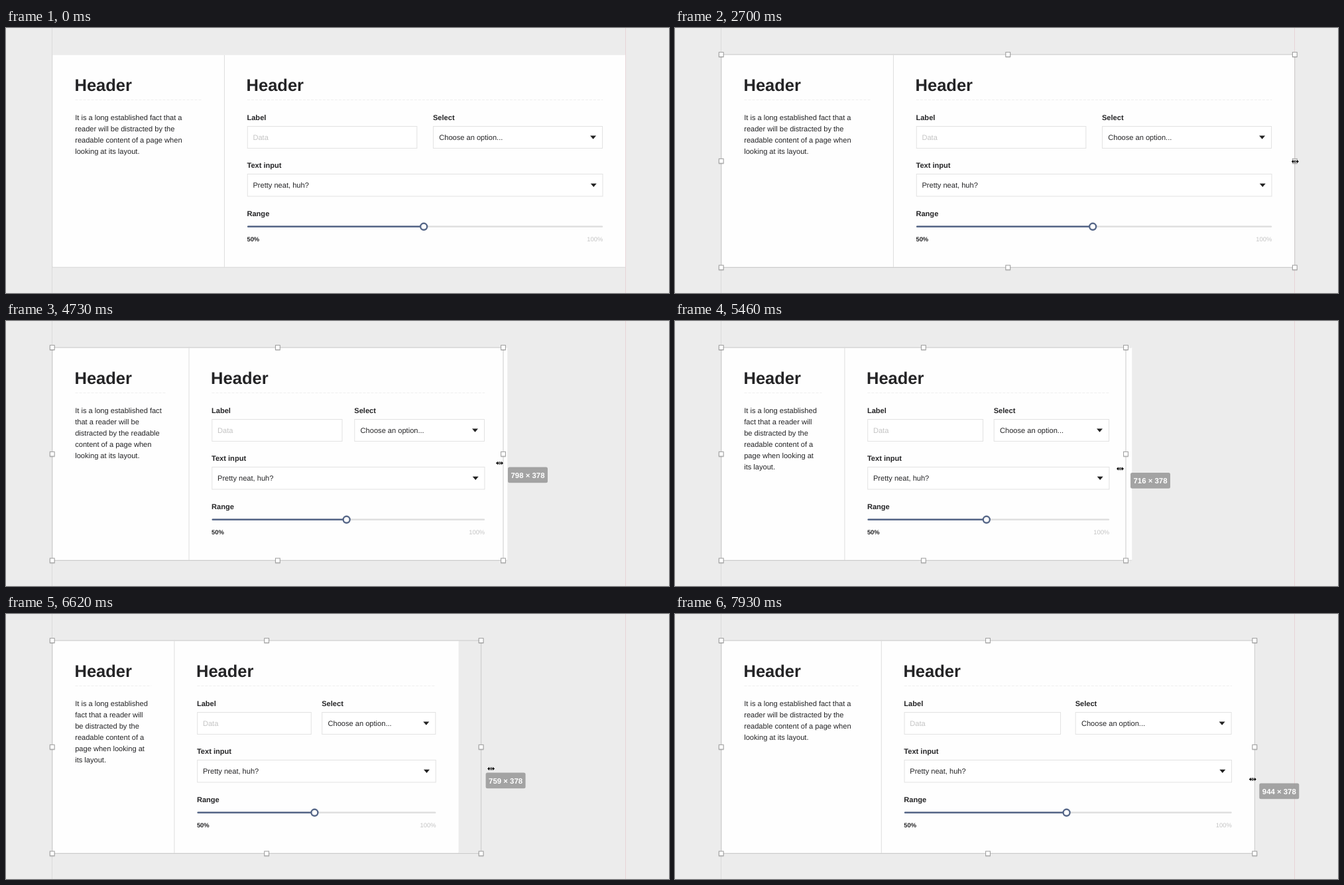
These frames come from a looping animation (1000 by 400 pixels, 7.99 s). An HTML page:

```html
<!DOCTYPE html>
<html lang="en">
<head>
<meta charset="utf-8">
<title>Resizable form</title>
<style>
  html, body { margin: 0; width: 100%; height: 100%; overflow: hidden; background: #ececec; }
  svg { display: block; width: 1000px; height: 400px; }
  text {
    font: 11.08px "Liberation Sans", Arial, sans-serif;
    fill: #242426;
    text-rendering: geometricPrecision;
  }
  .bold { font-weight: bold; }
  .head { font-size: 25.5px; font-weight: bold; }
  .tiny { font-size: 9.37px; }
  .pale { fill: #c4c4c4; }
  .field { fill: #fff; stroke: #e2e2e2; }
  .rule { stroke: #efefef; stroke-dasharray: 4 2; }
</style>
</head>
<body>
<svg id="stage" viewBox="0 0 1000 400" xmlns="http://www.w3.org/2000/svg"></svg>
<script>
const LOOP = 7990;
const LEFT = 70, TOP = 40, BOTTOM = 361.5, PAD = 34.5;
const FULL = 934.8;
const UNITS = 1015 / 865;
const BLUE = '#566788';
const COPY = ('It is a long established fact that a reader will be distracted by the ' +
  'readable content of a page when looking at its layout.').split(' ');

// Motion keys: [time, value]
const EDGE = [[3660, FULL], [3865, 889.6], [3950, 872], [4370, 798], [4645, 756.7],
  [4730, 750], [5230, 710], [5375, 689.7], [5460, 680], [5800, 648], [6040, 637],
  [6250, 640], [6400, 654], [6535, 683], [6620, 716.6], [6870, 777], [7100, 819],
  [7400, 859], [7720, 873], [7845, 874.3], [7930, 874.3]];
const LEAD = [[3660, 0.6], [3950, -14.5], [4370, -8], [4730, -5.5], [5460, -8.5],
  [6040, -4], [6620, 15], [6870, 9], [7400, 0], [7930, -3]];
const HAND_Y = [[3660, 201.5], [3950, 201], [4730, 214.5], [5460, 223], [6620, 233.5], [7930, 249.5]];
const ARROW_X = [[900, 958], [1150, 912], [1860, 912], [2150, 932], [2420, 943], [2650, 935]];
const ARROW_Y = [[900, 396], [1150, 332], [1860, 332], [2150, 275], [2420, 220], [2650, 201]];

// Dragging redraws in uneven ticks between these times
const TICKS = [3660, 3950, 4370, 4460, 4730, 5230, 5310, 5460, 6040, 6130, 6620, 6870,
  6960, 7720, 7810, 7930];
const TEAR = 3950;
const LAG = 85;

function curve(keys, t) {
  const last = keys.length - 1;
  if (t <= keys[0][0]) return keys[0][1];
  if (t >= keys[last][0]) return keys[last][1];
  let i = 0;
  while (t >= keys[i + 1][0]) i++;
  const slope = j => j === 0 || j === last ? 0
    : (keys[j + 1][1] - keys[j - 1][1]) / (keys[j + 1][0] - keys[j - 1][0]);
  const [t0, a] = keys[i], [t1, b] = keys[i + 1];
  const d = t1 - t0, u = (t - t0) / d, v = 1 - u;
  return v * v * (1 + 2 * u) * a + u * u * (3 - 2 * u) * b
    + u * v * d * (v * slope(i) - u * slope(i + 1));
}

function snap(t) {
  if (t < TICKS[0]) return t;
  let i = TICKS.length - 1;
  while (t < TICKS[i]) i--;
  if (i === TICKS.length - 1) return TICKS[i];
  const gap = TICKS[i + 1] - TICKS[i];
  const step = gap / Math.max(1, Math.round(gap / 80));
  return TICKS[i] + Math.floor((t - TICKS[i]) / step) * step;
}

function set(node, attrs) {
  for (const k in attrs) node.setAttribute(k, attrs[k]);
}
function add(name, attrs, parent = stage) {
  const node = document.createElementNS('http://www.w3.org/2000/svg', name);
  set(node, attrs);
  return parent.appendChild(node);
}
function label(str, y, cls = '', extra = {}) {
  const node = add('text', { y, class: cls, ...extra });
  node.textContent = str;
  return node;
}
const field = (y, height) => add('rect', { class: 'field', y, height });
const caret = () => add('path', { d: 'M-4.5-2.5h9L0 2.7z', fill: '#222' });
const show = (node, on) => set(node, { visibility: on ? 'visible' : 'hidden' });
const move = (node, x, y) => set(node, { transform: `translate(${x} ${y})` });

const stage = document.getElementById('stage');

add('rect', { width: 1000, height: 400, fill: '#ececec' });
add('path', { d: 'M69.5 0V400', stroke: '#dadada' });
const shade = add('rect', { x: LEFT - 0.5, y: TOP + 0.5, height: 321.3, rx: 1.5, fill: '#d9d9d9' });
const card = add('rect', { x: LEFT + 0.3, y: TOP + 0.5, height: 320.3, rx: 1, fill: '#fefefe' });
const divider = add('path', { stroke: '#dedede' });
const rules = [add('path', { class: 'rule' }), add('path', { class: 'rule' })];

label('Header', 95.3, 'head', { x: 103.5 });
const lines = [];
for (let i = 0; i < 8; i++) lines.push(label('', 139 + 17 * i, '', { x: 104.2 }));

const title = label('Header', 95.3, 'head');
const captions = [label('Label', 139, 'bold'), label('Text input', 211, 'bold'),
  label('Range', 284, 'bold'), label('50%', 322.2, 'bold tiny')];
const pickName = label('Select', 139, 'bold');
const dataBox = field(148.5, 33), pickBox = field(148.5, 33), wideBox = field(220.5, 33.5);
const dataText = label('Data', 169, 'pale');
const pickText = label('Choose an option...', 169);
const wideText = label('Pretty neat, huh?', 241);
const pickCaret = caret(), wideCaret = caret();
const total = label('100%', 322.2, 'tiny pale', { 'text-anchor': 'end' });
const bar = { 'stroke-width': 2.6, 'stroke-linecap': 'round' };
const track = add('path', { ...bar, stroke: '#e0e0e0' });
const filled = add('path', { ...bar, stroke: BLUE });
const thumb = add('circle', { cy: 299.8, r: 5, fill: '#fff', stroke: BLUE, 'stroke-width': 2.4 });

add('path', { d: 'M934.5 0V400', stroke: '#e6cfd3', 'stroke-opacity': 0.8 });

const hover = add('rect', { x: 69.5, y: TOP, width: 865, height: 321.5,
  fill: 'none', stroke: '#7fb0ea', 'stroke-width': 2 });

const frame = add('g', {});
const outline = add('path', { fill: 'none', stroke: '#cbcbcb' }, frame);
const handles = [];
for (let i = 0; i < 8; i++) {
  const g = add('g', {}, frame);
  add('rect', { x: -4, y: -2.6, width: 8, height: 7.6, rx: 1, fill: '#000', opacity: 0.12 }, g);
  add('rect', { x: -3.4, y: -3.4, width: 6.8, height: 6.8, fill: '#fff', stroke: '#9b9b9b' }, g);
  handles.push(g);
}

const badge = add('g', {});
add('rect', { width: 60, height: 23.8, rx: 2.5, fill: '#999', opacity: 0.88 }, badge);
const size = add('text', { x: 30, y: 16.2, class: 'bold', 'text-anchor': 'middle',
  style: 'font-size:11.4px;fill:#fff' }, badge);

const arrow = add('path', { d: 'M0 0V11L2.6 8.6L4.3 12.3L6 11.5L4.4 8H7.8z',
  fill: '#000', stroke: '#fff', 'stroke-width': 0.9 });
const hand = add('path', {
  d: 'M-5.5 0L-2.6-2.7V-.6H-1.3V-2.2H-.4V2.2H-1.3V.6H-2.6V2.7z' +
     'M5.5 0L2.6-2.7V-.6H1.3V-2.2H.4V2.2H1.3V.6H2.6V2.7z',
  fill: '#000', stroke: '#fff', 'stroke-width': 1, 'paint-order': 'stroke' });

const pen = document.createElement('canvas').getContext('2d');
pen.font = '110.8px "Liberation Sans", Arial, sans-serif';
const measure = str => pen.measureText(str).width / 10;

function wrap(width) {
  const rows = [];
  let row = '';
  for (const word of COPY) {
    const next = row ? row + ' ' + word : word;
    if (row && measure(next) > width) {
      rows.push(row);
      row = word;
    } else row = next;
  }
  rows.push(row);
  lines.forEach((node, i) => { node.textContent = rows[i] || ''; });
}

function layout(right) {
  const width = right - LEFT;
  const mid = LEFT + 0.3 * width;
  const x = mid + PAD, end = right - PAD, w = end - x;
  const half = 0.4765 * w, px = x + 0.523 * w, pr = end - 0.7;

  set(shade, { width: width + 0.3 });
  set(card, { width: width - 0.5 });
  set(divider, { d: `M${mid} 41V361` });
  set(rules[0], { d: `M104.5 108.5H${mid - PAD}` });
  set(rules[1], { d: `M${x} 108.5H${end}` });
  wrap(0.3 * width - 2 * PAD);

  set(title, { x: x - 1.4 });
  captions.forEach(node => set(node, { x: x - 0.5 }));
  set(pickName, { x: px - 0.5 });
  set(dataBox, { x: x + 0.3, width: half });
  set(pickBox, { x: px, width: pr - px });
  set(wideBox, { x: x + 0.3, width: w - 0.6 });
  set(dataText, { x: x + 8.5 });
  set(wideText, { x: x + 8.5 });
  set(pickText, { x: px + 8.8 });
  move(pickCaret, pr - 14, 165);
  move(wideCaret, end - 14, 237.3);
  set(total, { x: end });

  const knob = x + 0.506 * w - 5.2;
  set(track, { d: `M${x + 1.3} 299.8H${end - 1.3}` });
  set(filled, { d: `M${x + 1.3} 299.8H${knob}` });
  set(thumb, { cx: knob });
}

function select(low, high) {
  const l = 69.7, cy = (TOP + BOTTOM) / 2, cut = 180;
  set(outline, { d: `M${high} ${cut}V${TOP}H${l}V${BOTTOM}H${low}V${cut}` });
  [[l, TOP], [(l + high) / 2, TOP], [high, TOP], [l, cy], [low, cy],
    [l, BOTTOM], [(l + low) / 2, BOTTOM], [low, BOTTOM]]
    .forEach(([x, y], i) => move(handles[i], x, y));
}

function render(now) {
  const t = snap(now);
  const edge = curve(EDGE, t);
  const dragging = t >= 3660, resizing = t >= 2680;

  layout(curve(EDGE, t - LAG));
  show(frame, t >= 1600);
  select(edge, t === TEAR ? edge + 7.7 : edge);

  const ax = curve(ARROW_X, t), ay = curve(ARROW_Y, t);
  show(arrow, t >= 900 && !resizing);
  move(arrow, ax, ay);
  show(hover, t >= 900 && t < 1600 && ax < FULL && ay < BOTTOM);

  const hy = curve(HAND_Y, t);
  show(hand, resizing);
  move(hand, edge + curve(LEAD, t), hy);

  show(badge, dragging);
  move(badge, edge + 7, hy + 6);
  size.textContent = Math.round((edge - LEFT) * UNITS) + ' × 378';
}

const start = performance.now();
function tick() {
  render((performance.now() - start) % LOOP);
  requestAnimationFrame(tick);
}
tick();
</script>
</body>
</html>
```
